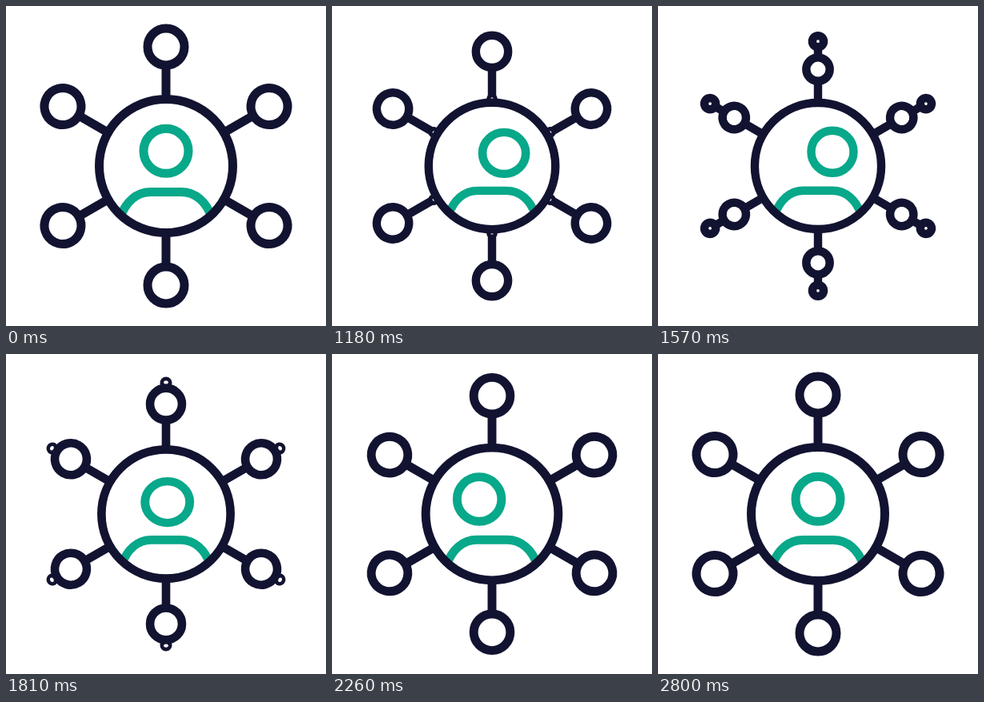
Recreate the animation shown at these times as an HTML page. Size 400x400 px, loop 2830 ms.

```html
<!DOCTYPE html>
<html lang="en">
<head>
<meta charset="utf-8">
<title>Network hub</title>
<style>
  html, body { margin: 0; width: 100%; height: 100%; overflow: hidden; background: #fff; }
  svg { display: block; width: 100vw; height: 100vh; }
  .dark { stroke: #121331; }
  .accent { stroke: #08a88a; }
</style>
</head>
<body>
<svg viewBox="0 0 400 400">
  <g id="hub" fill="none" stroke-width="11">
    <g id="spokes" class="dark"></g>
    <g class="accent">
      <path id="body" d="M-57 64C-50.5 45 -37 32.5 -19 32.5H19C37 32.5 50.5 45 57 64"/>
      <circle id="head" r="28"/>
    </g>
    <circle class="dark" r="83.5"/>
  </g>
</svg>
<script>
const LOOP = 2830, START = 1000, STEP = 30;
const HUB = 83.5, REACH = 149, NODE = 23, LOOK = 19;
const byId = id => document.getElementById(id);
const hub = byId('hub'), head = byId('head'), body = byId('body');

function add(parent, name, attrs) {
  const el = document.createElementNS('http://www.w3.org/2000/svg', name);
  for (const key in attrs) el.setAttribute(key, attrs[key]);
  return parent.appendChild(el);
}

const spokes = Array.from({ length: 6 }, (_, i) => {
  const g = add(byId('spokes'), 'g', { transform: `rotate(${i * 60})` });
  return {
    stem: add(g, 'line', { y1: -HUB }),
    leaving: add(g, 'circle', { fill: '#fff' }),
    arriving: add(g, 'circle', { fill: '#fff' })
  };
});

// Cubic Bezier easing with control points (x1, 0) and (x2, 1).
function ease(u, x1 = 0.333, x2 = 0.333) {
  if (u <= 0) return 0;
  if (u >= 1) return 1;
  let lo = 0, hi = 1;
  for (let i = 0; i < 24; i++) {
    const s = (lo + hi) / 2, r = 1 - s;
    if (3 * r * r * s * x1 + 3 * r * s * s * x2 + s * s * s < u) lo = s; else hi = s;
  }
  return lo * lo * (3 - 2 * lo);
}

const phase = (n, from, to) => ease((n - from) / (to - from));
const bump = e => 4 * e * (1 - e);

function placeNode(el, distance, radius) {
  el.setAttribute('cy', -distance);
  el.setAttribute('r', Math.max(radius, 0.01));
}

function draw(time) {
  const n = time < START + STEP ? 0 : (time - START) / STEP;

  const scale = 1 - 0.0605 * (phase(n, 0, 10) - phase(n, 10, 60));
  hub.setAttribute('transform', `translate(200 200) scale(${scale})`);

  const p = ease(n / 40, 0.35, 0.33);
  const shrunk = NODE * (1 - p);
  const oldDistance = REACH + NODE - shrunk;
  for (const { stem, leaving, arriving } of spokes) {
    stem.setAttribute('y2', -oldDistance);
    placeNode(leaving, oldDistance, shrunk);
    placeNode(arriving, HUB + (REACH - HUB) * p, NODE * p);
  }

  const right = phase(n, 0, 10), left = phase(n, 20, 40), back = phase(n, 40, 50);
  const x = LOOK * (right - 2 * left + back);
  const dip = bump(right) + bump(left);
  head.setAttribute('transform',
    `translate(${x} ${-18.7 + 3.3 * dip}) scale(${1 + 0.035 * dip} ${1 - 0.04 * dip})`);
  body.setAttribute('transform', `translate(0 ${bump(left)})`);
}

const origin = performance.now();
function tick() {
  draw((performance.now() - origin) % LOOP);
  requestAnimationFrame(tick);
}
tick();
</script>
</body>
</html>
```
